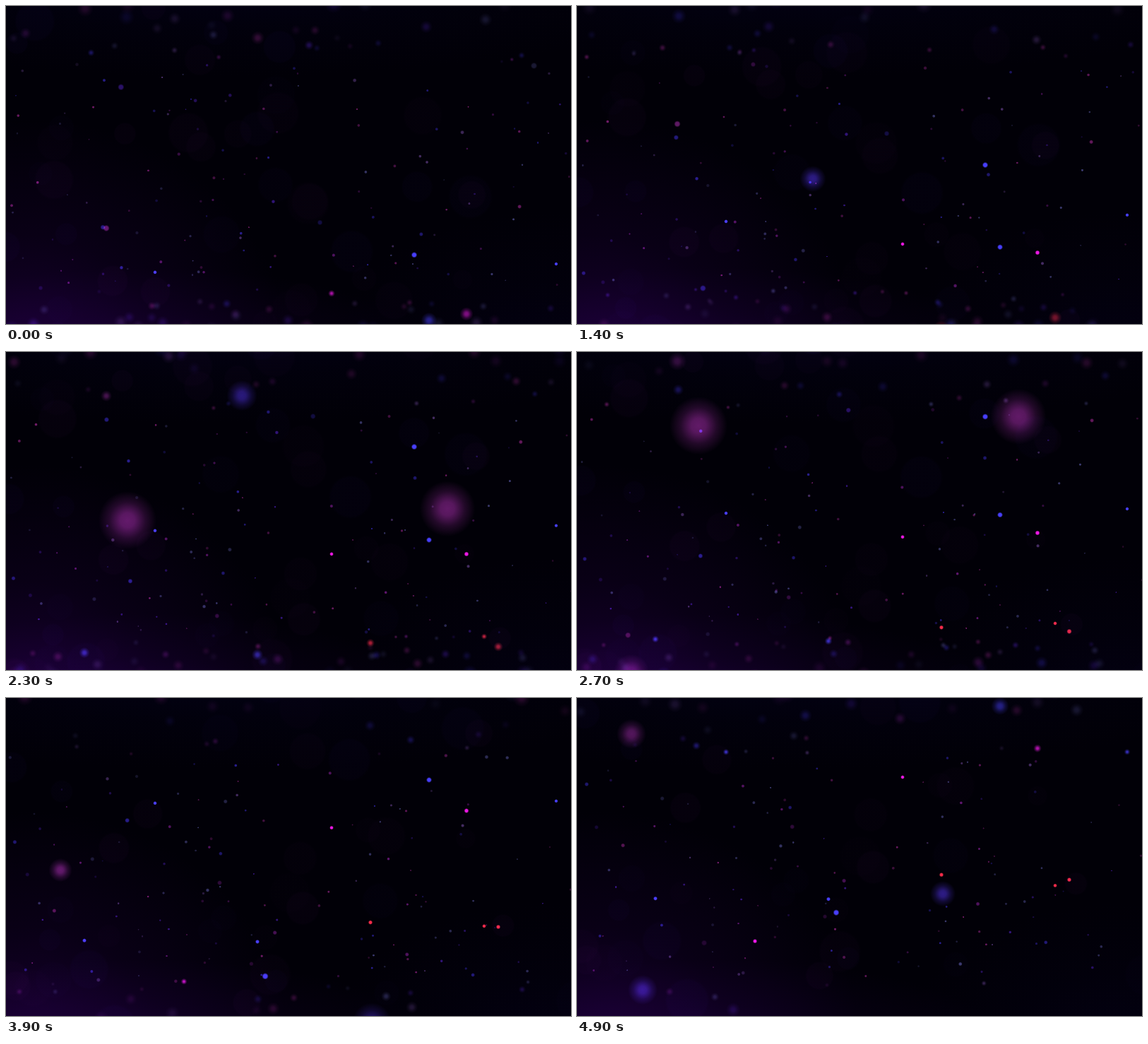
An HTML page with a canvas that plays this animation: 800x450 px, repeating every 5 s.

```html
<!DOCTYPE html>
<html lang="en">
<head>
<meta charset="utf-8">
<title>Floating particles</title>
<style>
html, body { margin: 0; width: 100%; height: 100%; overflow: hidden; background: #010007; }
canvas { display: block; width: 800px; height: 450px; }
</style>
</head>
<body>
<canvas id="stage" width="800" height="450"></canvas>
<script>
const W = 800, H = 450, LOOP = 5000, STEP = 100;
const ctx = document.getElementById("stage").getContext("2d");

const BLUE = "74,66,255", VIOLET = "72,45,205", MAGENTA = "245,25,230";
const PINK = "155,42,155", RED = "255,45,70";

let seed = 7;
function rand(a = 0, b = 1) {
  seed = (seed * 1664525 + 1013904223) % 4294967296;
  return a + (b - a) * seed / 4294967296;
}
const pick = list => list[Math.floor(rand(0, list.length))];

// A faster particle is nearer, so it is also larger
const sizeOf = speed => speed / 28 + Math.max(0, speed - 120) * .1;

const dots = [];

// Leading particle: crosses mid-height at x, at the given second
function lead(rgb, x, at, speed) {
  const near = speed > 105;
  dots.push({ x, at, speed, drift: 0, r: sizeOf(speed), rgb, alpha: near ? .62 : 1 });
}
lead(BLUE, 578, 1.4, 97);
lead(BLUE, 779, 2.65, 60);
lead(BLUE, 211, 2.75, 63);
lead(BLUE, 367, 5.7, 102);
lead(BLUE, 111, 5.8, 68);
lead(BLUE, 599, 2.76, 91);
lead(BLUE, 356, 5.8, 69);
lead(VIOLET, 334, 1.5, 197);
lead(VIOLET, 518, 5.17, 195);
lead(VIOLET, 93, 5.91, 195);
lead(MAGENTA, 652, 3.1, 79);
lead(MAGENTA, 252, 6.7, 72);
lead(MAGENTA, 461, 3.28, 65);
lead(PINK, 142, .87, 107);
lead(PINK, 77, 4, 186);
lead(PINK, 172, 2.34, 330);
lead(PINK, 625, 2.29, 320);
lead(RED, 516, 5.25, 73);
lead(RED, 677, 5.55, 64);
lead(RED, 697, 5.35, 73);

// Small dust, mostly slow and far
const dustColors = ["65,50,225", "85,35,200", "150,35,165", "185,45,160", "115,75,155", "95,95,170"];
for (let i = 0; i < 270; i++) {
  const speed = 50 + 50 * rand() ** 4;
  dots.push({
    x: W * rand() ** 1.1, at: rand(-4, 9), speed, drift: rand(-5, 5),
    r: sizeOf(speed) * rand(.5, 1.1), rgb: pick(dustColors), alpha: rand(.2, .65)
  });
}

// Faint out-of-focus discs
const discs = [];
for (let i = 0; i < 55; i++) discs.push({
  x: W * rand() ** 1.2, at: rand(-4, 9), speed: rand(48, 70), drift: rand(-3, 3),
  r: rand(14, 32), rgb: pick(["50,20,150", "100,20,120"]), alpha: rand(.015, .045)
});

function place(p, t) {
  const s = t - p.at;
  return [p.x + p.drift * s, H / 2 - p.speed * (s + .045 * s * s)];
}

function glow(x, y, r, rgb, alpha, core) {
  if (y < -r || y > H + r) return;
  const g = ctx.createRadialGradient(x, y, 0, x, y, r);
  g.addColorStop(0, `rgba(${rgb},${alpha})`);
  g.addColorStop(core, `rgba(${rgb},${alpha * .9})`);
  g.addColorStop((1 + core) / 2, `rgba(${rgb},${alpha * .35})`);
  g.addColorStop(1, `rgba(${rgb},0)`);
  ctx.fillStyle = g;
  ctx.fillRect(x - r, y - r, 2 * r, 2 * r);
}

// Focus is sharp across the middle and softens towards the top and bottom
function drawDot(p, t) {
  const [x, y] = place(p, t);
  const blur = Math.max(0, (92 - y) * .085, (y - 392) * .11);
  const r = p.r + Math.min(blur, 8);
  const soft = p.r > 6 || blur > 1;
  glow(x, y, r * 1.25, p.rgb, p.alpha * (p.r / r) ** .65, soft ? .25 : .6);
}

function drawDisc(p, t) {
  const [x, y] = place(p, t);
  glow(x, y, p.r, p.rgb, p.alpha, .88);
}

// Elliptical background light, fading from its centre
function wash(x, y, rx, ry, rgb, alpha) {
  ctx.save();
  ctx.translate(x, y);
  ctx.scale(rx, ry);
  const g = ctx.createRadialGradient(0, 0, 0, 0, 0, 1);
  g.addColorStop(0, `rgba(${rgb},${alpha})`);
  g.addColorStop(.5, `rgba(${rgb},${alpha * .36})`);
  g.addColorStop(1, `rgba(${rgb},0)`);
  ctx.fillStyle = g;
  ctx.fillRect(-1, -1, 2, 2);
  ctx.restore();
}

function draw(t) {
  ctx.globalCompositeOperation = "source-over";
  ctx.fillStyle = "#010007";
  ctx.fillRect(0, 0, W, H);
  ctx.globalCompositeOperation = "lighter";
  wash(30, 490, 370, 330, "32,0,58", .7);
  wash(200, 500, 420, 130, "26,0,50", .6);
  wash(300, -30, 700, 130, "3,2,22", .6);
  wash(760, 490, 300, 200, "6,1,28", .4);
  for (const p of discs) drawDisc(p, t);
  for (const p of dots) drawDot(p, t);
}

function frame() {
  const ms = performance.now() % LOOP;
  draw(Math.floor(ms / STEP) * STEP / 1000);
  requestAnimationFrame(frame);
}
frame();
</script>
</body>
</html>
```
